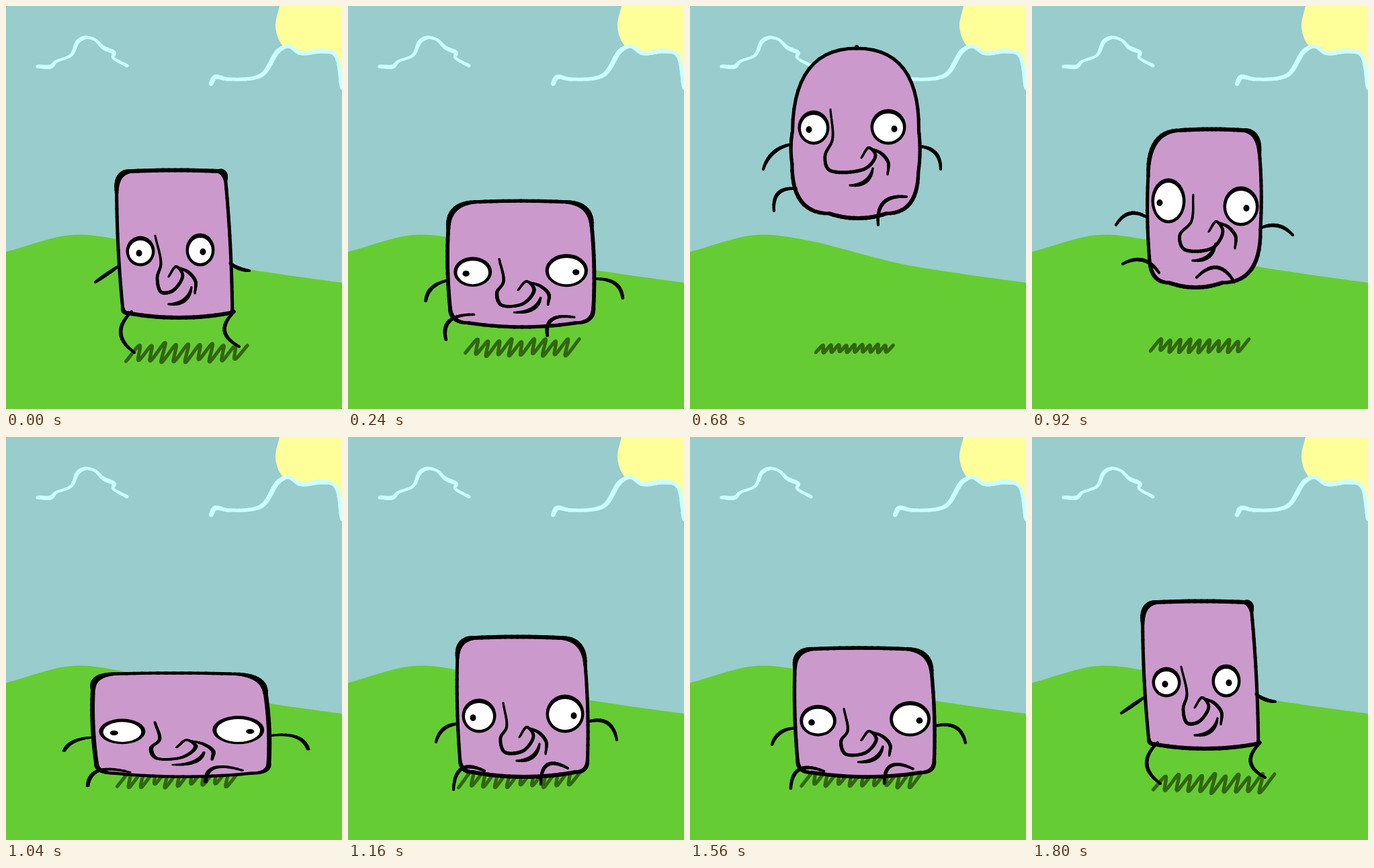
An HTML page with a canvas that plays this animation: 500 by 600 pixels, repeating every 1.84 s.

```html
<!DOCTYPE html>
<html lang="en">
<head>
<meta charset="utf-8">
<title>Bouncing block</title>
<style>
  html, body { margin: 0; width: 100%; height: 100%; overflow: hidden; background: #9cc; }
  canvas { display: block; }
</style>
</head>
<body>
<canvas id="stage" width="500" height="600"></canvas>
<script>
const ctx = document.getElementById('stage').getContext('2d');
const LOOP = 1840, GROUND = 505, MIDDLE = 258;

// box: left, top, right, bottom, shift of the bottom edge
// round: corner sizes as a share of half an edge, clockwise from top left
// eye: centre, radii, pupil shift    nose: bridge, lower left corner, top of the nostril
// arm: height of shoulder, hand, bend    leg: hip, foot, bend    shadow: left, right, y
const stand = {
  box: [163, 246, 326, 457, 11], round: [.3, .12, .04, .08],
  eyeL: [200, 366, 19, 19, -2], eyeR: [289, 364, 19, 21, 4],
  nose: [222, 342, 229, 425, 253, 388], mouth: [242, 444],
  armL: [388, 133, 411, 0], armR: [383, 362, 394, .15],
  legL: [187, 455, 191, 516, .6], legR: [340, 455, 347, 507, .7],
  shadow: [185, 354, 516]
};
const rise = {
  box: [163, 105, 336, 339, -3], round: [1, .4, .5, .5],
  eyeL: [194, 240, 20, 22, -8], eyeR: [292, 240, 22, 23, 9],
  nose: [222, 205, 227, 306, 259, 252], mouth: [241, 317],
  armL: [264, 144, 333, .32], armR: [263, 349, 320, -.25],
  legL: [168, 275, 172, 380, .05], legR: [324, 314, 311, 377, .1],
  shadow: [205, 318, 514]
};
const fall = {
  box: [154, 63, 342, 309, -3], round: [1, 1, .5, .6],
  eyeL: [184, 182, 21, 22, -7], eyeR: [295, 181, 24, 23, 9],
  nose: [209, 154, 205, 243, 266, 211], mouth: [238, 267],
  armL: [206, 109, 243, .3], armR: [209, 373, 243, -.45],
  legL: [158, 272, 125, 305, .6], legR: [322, 284, 280, 326, .6],
  shadow: [190, 300, 510]
};
const drop = {
  box: [172, 185, 338, 412, 3], round: [.6, .3, .7, .35],
  eyeL: [203, 291, 23, 30, -13], eyeR: [311, 299, 24, 26, 8],
  nose: [240, 281, 224, 361, 274, 321], mouth: [239, 379],
  armL: [315, 125, 326, .5], armR: [330, 388, 341, -.35],
  legL: [189, 397, 135, 384, .45], legR: [301, 411, 245, 404, .65],
  shadow: [180, 318, 506]
};
const land = {
  box: [162, 299, 352, 499, 5], round: [.3, .4, .2, .2],
  eyeL: [195, 416, 23, 22, -9], eyeR: [323, 413, 26, 25, 13],
  nose: [231, 396, 231, 468, 266, 432], mouth: [251, 482],
  armL: [427, 131, 454, .35], armR: [424, 400, 451, -.55],
  legL: [203, 497, 157, 525, .75], legR: [327, 493, 287, 517, .85],
  shadow: [172, 343, 507]
};
const hop = {
  box: [153, 208, 354, 375, 3], round: [.4, .5, .3, .5],
  eyeL: [196, 303, 20, 17, -7], eyeR: [307, 301, 22, 17, 6],
  nose: [220, 280, 232, 350, 260, 320], mouth: [252, 364],
  armL: [319, 122, 335, 0], armR: [313, 393, 326, -.1],
  legL: [187, 375, 151, 409, .65], legR: [320, 372, 299, 411, .95],
  shadow: [168, 326, 499]
};

const linear = k => k, easeIn = k => k * k, easeOut = k => 1 - (1 - k) ** 2;

// time, pose, [scale x, scale y, lift], easing towards the next key
const KEYS = [
  [0, stand, [1, 1, 0], linear],
  [160, land, [1.18, .84, 0], linear],
  [360, rise, [1, 1, 0], easeOut],
  [540, fall, [1, 1, 14], easeIn],
  [680, fall, [1, 1, 0], k => k ** 1.5],
  [920, drop, [1, 1, 0], linear],
  [1040, land, [1.35, .74, 0], easeOut],
  [1160, land, [1, 1, 0], linear],
  [1360, hop, [1, 1, 0], easeOut],
  [1400, hop, [1, 1, 7], easeIn],
  [1560, land, [1.07, .92, 0], easeOut],
  [1800, stand, [1, 1, 0], linear],
  [LOOP, stand, [1, 1, 0], linear]
];

// Three bursts of nine drawings, each held for a multiple of 40 ms
const TICKS = [0];
for (const [start, end] of [[80, 680], [680, 1240], [1240, 1800]])
  for (let i = 0; i < 9; i++)
    TICKS.push(start + 40 * Math.round((end - start) * i / 9 / 40));
TICKS.push(1800);

const HILL = [[0, 366], [97, 341], [170, 348], [310, 383], [400, 398], [500, 412]];
const LEFT_CLOUD = [[47, 90], [67, 90], [74, 83], [97, 73], [107, 53], [118, 47], [132, 50],
  [145, 62], [161, 70], [159, 76], [180, 89]];
const RIGHT_CLOUD = [[305, 116], [311, 106], [332, 109], [380, 103], [405, 67], [420, 60],
  [438, 70], [470, 67], [489, 72], [500, 122]];

const mix = (a, b, k) => a.map((v, i) => v + (b[i] - v) * k);
const noise = n => { const v = Math.sin(n * 12.9898) * 43758.5453; return v - Math.floor(v); };

function quad(a, c, b, steps = 14) {
  return Array.from({ length: steps + 1 }, (_, i) =>
    mix(mix(a, c, i / steps), mix(c, b, i / steps), i / steps));
}

// Centripetal Catmull-Rom curve through the points
function spline(points) {
  const n = points.length, out = [], steps = 12;
  const ends = [mix(points[1], points[0], 2), ...points, mix(points[n - 2], points[n - 1], 2)];
  const gap = (a, b) => Math.sqrt(Math.hypot(b[0] - a[0], b[1] - a[1])) + 1e-3;
  for (let i = 0; i < n - 1; i++) {
    const [p0, p1, p2, p3] = ends.slice(i, i + 4);
    const t1 = gap(p0, p1), t2 = t1 + gap(p1, p2), t3 = t2 + gap(p2, p3);
    for (let s = 0; s < steps; s++) {
      const t = t1 + (t2 - t1) * s / steps;
      const a = mix(p0, p1, t / t1);
      const b = mix(p1, p2, (t - t1) / (t2 - t1));
      const c = mix(p2, p3, (t - t2) / (t3 - t2));
      out.push(mix(mix(a, b, t / t2), mix(b, c, (t - t1) / (t3 - t1)), (t - t1) / (t2 - t1)));
    }
  }
  return [...out, points[n - 1]];
}

function trace(points) {
  ctx.beginPath();
  points.forEach(p => ctx.lineTo(p[0], p[1]));
}

function fill(points, color) {
  trace(points);
  ctx.fillStyle = color;
  ctx.fill();
}

function brush(points, color, widthAt) {
  ctx.strokeStyle = color;
  for (let i = 1; i < points.length; i++) {
    ctx.lineWidth = widthAt(i / points.length);
    trace([points[i - 1], points[i]]);
    ctx.stroke();
  }
}

// A pen line that thins out at both ends
function ink(points, width, tip = .6) {
  brush(points, '#000', u => width * (tip + (1 - tip) * Math.sin(Math.PI * u)));
}

function dot(x, y, rx, ry, color) {
  ctx.beginPath();
  ctx.ellipse(x, y, rx, ry, 0, 0, 7);
  ctx.fillStyle = color;
  ctx.fill();
}

function drawScenery() {
  ctx.fillStyle = '#9cc';
  ctx.fillRect(0, 0, 500, 600);
  const leftCloud = spline(LEFT_CLOUD), rightCloud = spline(RIGHT_CLOUD);
  const sunEdge = spline([[407, 0], [401, 28], [405, 48], [412, 60]]);
  fill([...sunEdge, ...rightCloud.filter(p => p[0] > 414), [500, 0]], '#ff9');
  brush(leftCloud, '#cff', u => 5 + Math.sin(u * 19));
  brush(rightCloud, '#cff', u => 6 + Math.sin(u * 19));
  fill([...spline(HILL), [500, 600], [0, 600]], '#6c3');
}

// A slanted scribble, taller when it is wider
function drawShadow([left, right, y], seed) {
  const count = 19, width = right - left, points = [];
  for (let i = 0; i <= count; i++) {
    const side = i % 2 ? 1 : -1;
    const size = (width - 65) / 7 * (.6 + .4 * noise(seed * 31 + i));
    points.push([left + width * i / count + side * size / 2, y - side * size]);
  }
  brush(spline(points), '#361', () => 5);
}

function drawBody([left, top, right, bottom, shift], round) {
  const corners = [[left, top], [right, top], [right + shift, bottom], [left + shift, bottom]];
  const bulges = [[0, -3], [4, 0], [0, 14], [-4, 0]];
  const arcs = corners.map((corner, i) => {
    const before = corners[(i + 3) % 4], after = corners[(i + 1) % 4];
    return quad(mix(corner, before, round[i] / 2), corner, mix(corner, after, round[i] / 2));
  });
  const edges = arcs.map((arc, i) => {
    const a = arc[arc.length - 1], b = arcs[(i + 1) % 4][0], middle = mix(a, b, .5);
    return quad(a, [middle[0] + bulges[i][0], middle[1] + bulges[i][1]], b);
  });
  fill(arcs.flatMap((arc, i) => [...arc, ...edges[i]]), '#c9c');
  arcs.forEach((arc, i) => {
    const extra = i < 2 ? 5 * (1 - round[i]) : 1;
    brush(arc, '#000', u => 5 + extra * Math.sin(Math.PI * u));
    brush(edges[i], '#000', () => i % 2 ? 5 : 6);
  });
}

function drawEye([x, y, rx, ry, look]) {
  dot(x, y - 1, rx + 2.5, ry + 3.5, '#000');
  dot(x, y, rx - 2, ry - 2, '#fff');
  dot(x + look, y + 2, 4.5, 5, '#000');
}

function drawFace([bridgeX, bridgeY, lowX, lowY, topX, topY], [mouthX, mouthY]) {
  ink(spline([
    [bridgeX, bridgeY], [(bridgeX + lowX) / 2 + 5, (bridgeY + lowY) / 2],
    [lowX - 4, lowY - 20], [lowX + 2, lowY + 1], [topX - 5, lowY - 1],
    [topX + 10, topY + (lowY - topY) * .35], [topX, topY], [topX - 11, topY + 15]
  ]), 5);
  ink(spline([[2, 1], [18, 8], [29, 22], [28, 40]].map(([x, y]) => [topX + x, topY + y])), 5);
  ink(quad([mouthX, mouthY], [mouthX + 29, mouthY + 1], [mouthX + 34, mouthY - 25]), 6.5, .4);
}

function drawLimb(x0, y0, x1, y1, bend) {
  const elbow = [(x0 + x1) / 2 - bend * (y1 - y0), (y0 + y1) / 2 + bend * (x1 - x0)];
  ink(quad([x0, y0], elbow, [x1, y1]), 5.5, .7);
}

function drawBlock(pose, [scaleX, scaleY, lift]) {
  ctx.save();
  ctx.translate(MIDDLE, GROUND - lift);
  ctx.scale(scaleX, scaleY);
  ctx.translate(-MIDDLE, -GROUND);
  const [left, , right, , shift] = pose.box;
  drawBody(pose.box, pose.round);
  drawEye(pose.eyeL);
  drawEye(pose.eyeR);
  drawFace(pose.nose, pose.mouth);
  drawLimb(left + shift / 2 - 2, ...pose.armL);
  drawLimb(right + shift / 2 + 2, ...pose.armR);
  drawLimb(...pose.legL);
  drawLimb(...pose.legR);
  ctx.restore();
}

function frame() {
  const now = performance.now() % LOOP;
  const tick = TICKS.findLastIndex(t => t <= now), time = TICKS[tick];
  const i = KEYS.findLastIndex(key => key[0] <= time);
  const [start, from, shapeA, ease] = KEYS[i], [end, to, shapeB] = KEYS[i + 1];
  const k = ease((time - start) / (end - start));
  const pose = {};
  for (const part in from) pose[part] = mix(from[part], to[part], k);

  ctx.lineCap = ctx.lineJoin = 'round';
  drawScenery();
  drawShadow(pose.shadow, tick + 1);
  drawBlock(pose, mix(shapeA, shapeB, k));
  requestAnimationFrame(frame);
}
frame();
</script>
</body>
</html>
```
